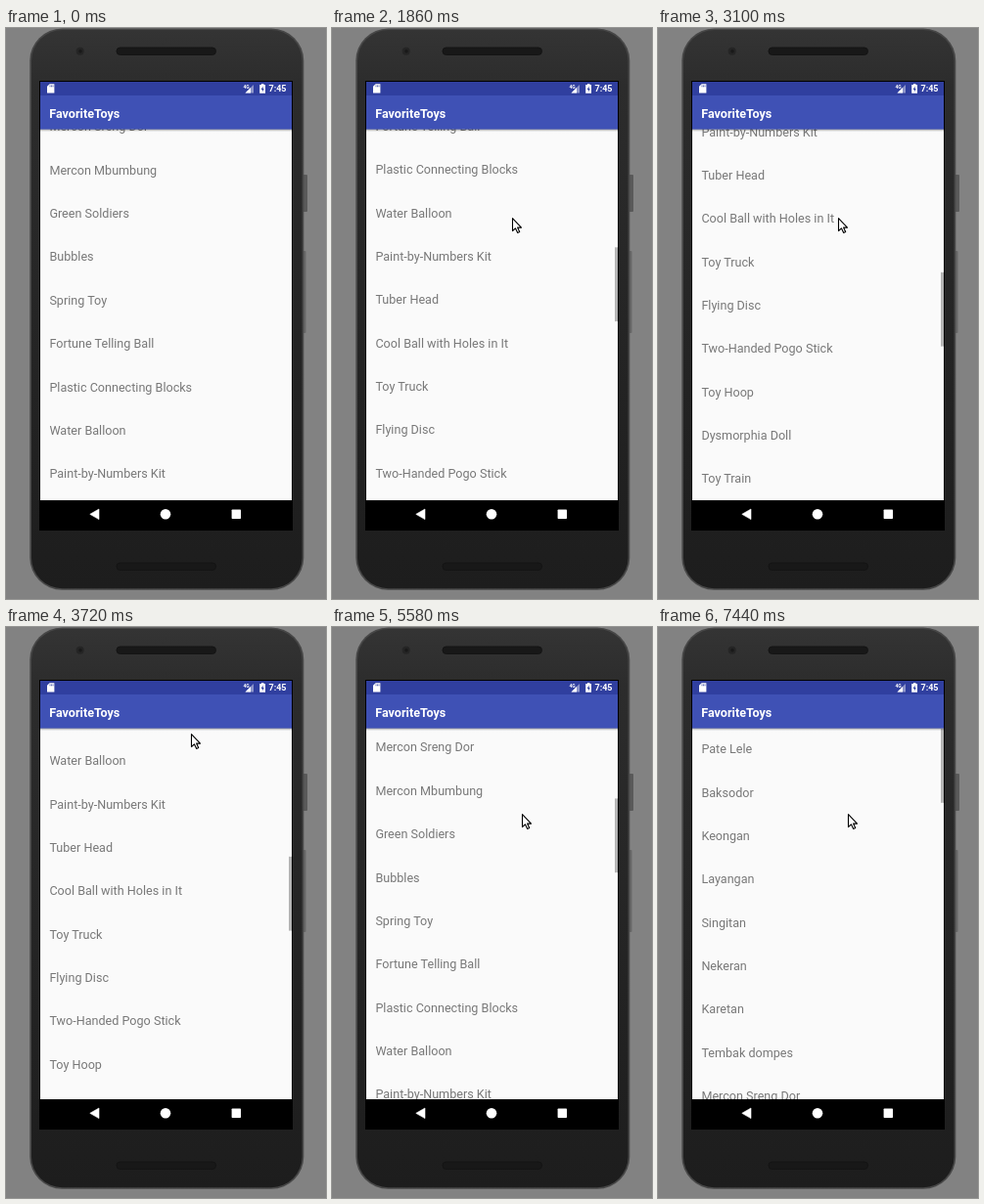
An HTML page that plays this animation: 327 by 584 pixels, repeating every 8000 ms.

```html
<!DOCTYPE html>
<html lang="en">
<head>
<meta charset="utf-8">
<title>Scrolling list</title>
<style>
html, body { margin: 0; width: 100%; height: 100%; overflow: hidden; background: #828282; }
svg { display: block; width: 100vw; height: 100vh; }
text { font-family: Roboto, "Noto Sans", sans-serif; }
#list text { font-size: 12.6px; fill: #787878; }
</style>
</head>
<body>
<svg viewBox="0 0 327 584">
  <defs>
    <linearGradient id="body" x1="0" y1="0" x2="0" y2="1">
      <stop offset="0" stop-color="#343434"/>
      <stop offset=".1" stop-color="#2c2c2c"/>
      <stop offset=".88" stop-color="#1f1f1f"/>
      <stop offset="1" stop-color="#1d1d1d"/>
    </linearGradient>
    <linearGradient id="shade" x1="0" y1="0" x2="0" y2="1">
      <stop offset="0" stop-opacity=".4"/>
      <stop offset="1" stop-opacity="0"/>
    </linearGradient>
    <clipPath id="view"><rect x="35" y="103" width="257" height="380"/></clipPath>
  </defs>

  <rect width="327" height="584" fill="#828282"/>

  <!-- phone -->
  <rect x="303" y="150" width="5" height="38" rx="1" fill="#5a5a5a"/>
  <rect x="303" y="228" width="3.5" height="84" rx="1" fill="#686868"/>
  <rect x="24.3" y=".5" width="280" height="574.2" rx="33" fill="#474747"/>
  <rect x="26" y="2" width="276.6" height="571.2" rx="31.5" fill="url(#body)"/>
  <g fill="#181818" stroke="#141414">
    <rect x="113" y="20" width="101.5" height="7.5" rx="3.7"/>
    <rect x="113" y="547" width="101.5" height="7.5" rx="3.7"/>
  </g>
  <circle cx="75.7" cy="23.7" r="4" fill="#252525"/>
  <circle cx="76" cy="23.7" r="1.8" fill="#191919"/>
  <rect x="34" y="54" width="259" height="460" fill="#000"/>

  <!-- screen -->
  <rect x="35" y="103" width="257" height="380" fill="#fafafa"/>
  <g clip-path="url(#view)">
    <g id="list"></g>
    <rect id="bar" x="289" width="3" height="75.8" fill="#b4b4b4"/>
  </g>
  <rect x="35" y="103" width="257" height="3" fill="url(#shade)"/>
  <rect x="35" y="55" width="257" height="14.2" fill="#303f9f"/>
  <rect x="35" y="69" width="257" height="34.6" fill="#3f51b5"/>
  <text x="44.2" y="91.6" font-size="12.6" font-weight="700" fill="#fff">FavoriteToys</text>

  <!-- status icons -->
  <g fill="#fff">
    <path d="M44.6 57.3H49.4V66.5H42V59.8Z"/>
    <path d="M253 58V66.5H244.5Z" opacity=".45"/>
    <path d="M250 61V66.5H244.5Z"/>
    <text x="242.4" y="62" font-size="5" font-weight="700">4G</text>
    <path d="M261 57H263.4V58H265V66.8H259.2V58H261Z"/>
    <text x="268.5" y="65.4" font-size="9" font-weight="700">7:45</text>
  </g>
  <path d="M45 58.5V60.3M46.5 58.5V60.3M48 58.5V60.3" stroke="#303f9f" stroke-width=".7"/>
  <path d="M262.6 59.6L260.7 62.9H261.9V65.4L263.7 62H262.6Z" fill="#303f9f"/>

  <!-- navigation -->
  <g fill="#fff">
    <path d="M85.8 497.3L95 492V502.6Z" stroke="#fff" stroke-width=".6" stroke-linejoin="round"/>
    <circle cx="163" cy="497.3" r="5.3"/>
    <rect x="230.6" y="492.6" width="9.4" height="9.4" rx=".7"/>
  </g>

  <path id="cursor" d="M.5 .7V13.5L3.4 10.8L5.7 15.5L7.7 14.6L5.6 10.1H9.5Z" fill="#fff" stroke="#000" stroke-width="1.1" stroke-linejoin="round"/>
</svg>
<script>
const TOYS = ["Pate Lele", "Baksodor", "Keongan", "Layangan", "Singitan", "Nekeran", "Karetan",
  "Tembak dompes", "Mercon Sreng Dor", "Mercon Mbumbung", "Green Soldiers", "Bubbles", "Spring Toy",
  "Fortune Telling Ball", "Plastic Connecting Blocks", "Water Balloon", "Paint-by-Numbers Kit",
  "Tuber Head", "Cool Ball with Holes in It", "Toy Truck", "Flying Disc", "Two-Handed Pogo Stick",
  "Toy Hoop", "Dysmorphia Doll", "Toy Train", "Fake Vomit", "Toy Telephone"];
const ROW = 44.36, STEP = 620, LOOP = 8000;

// scroll offset, cursor position, scrollbar shown
const REST = [194, 191], MID = [184, 194];
const POSES = [
  [378.7, null, false],
  [378.7, [170, 212], false],
  [388.7, MID, true],
  [601, MID, true],
  [804, MID, true],
  [728.4, MID, true],
  [653.4, [189, 109], true],
  [653.4, REST, false],
  [566.7, REST, true],
  [356.6, REST, true],
  [170.4, REST, true],
  [66, REST, true],
  [0, REST, true]
];

const $ = id => document.getElementById(id);
const list = $("list"), bar = $("bar"), cursor = $("cursor");

TOYS.forEach((name, i) => {
  const row = document.createElementNS("http://www.w3.org/2000/svg", "text");
  row.setAttribute("x", 44.4);
  row.setAttribute("y", 129.2 + ROW * i);
  row.textContent = name;
  list.append(row);
});

const show = (el, on) => el.setAttribute("visibility", on ? "visible" : "hidden");

function draw(time) {
  const [scroll, pointer, hasBar] = POSES[Math.floor((time % LOOP) / STEP)];
  list.setAttribute("transform", `translate(0 ${-scroll})`);
  bar.setAttribute("y", 104 + scroll * 0.2002);
  show(bar, hasBar);
  show(cursor, pointer);
  if (pointer) cursor.setAttribute("transform", `translate(${pointer})`);
}

const start = performance.now();
function tick() {
  draw(performance.now() - start);
  requestAnimationFrame(tick);
}
tick();
</script>
</body>
</html>
```
